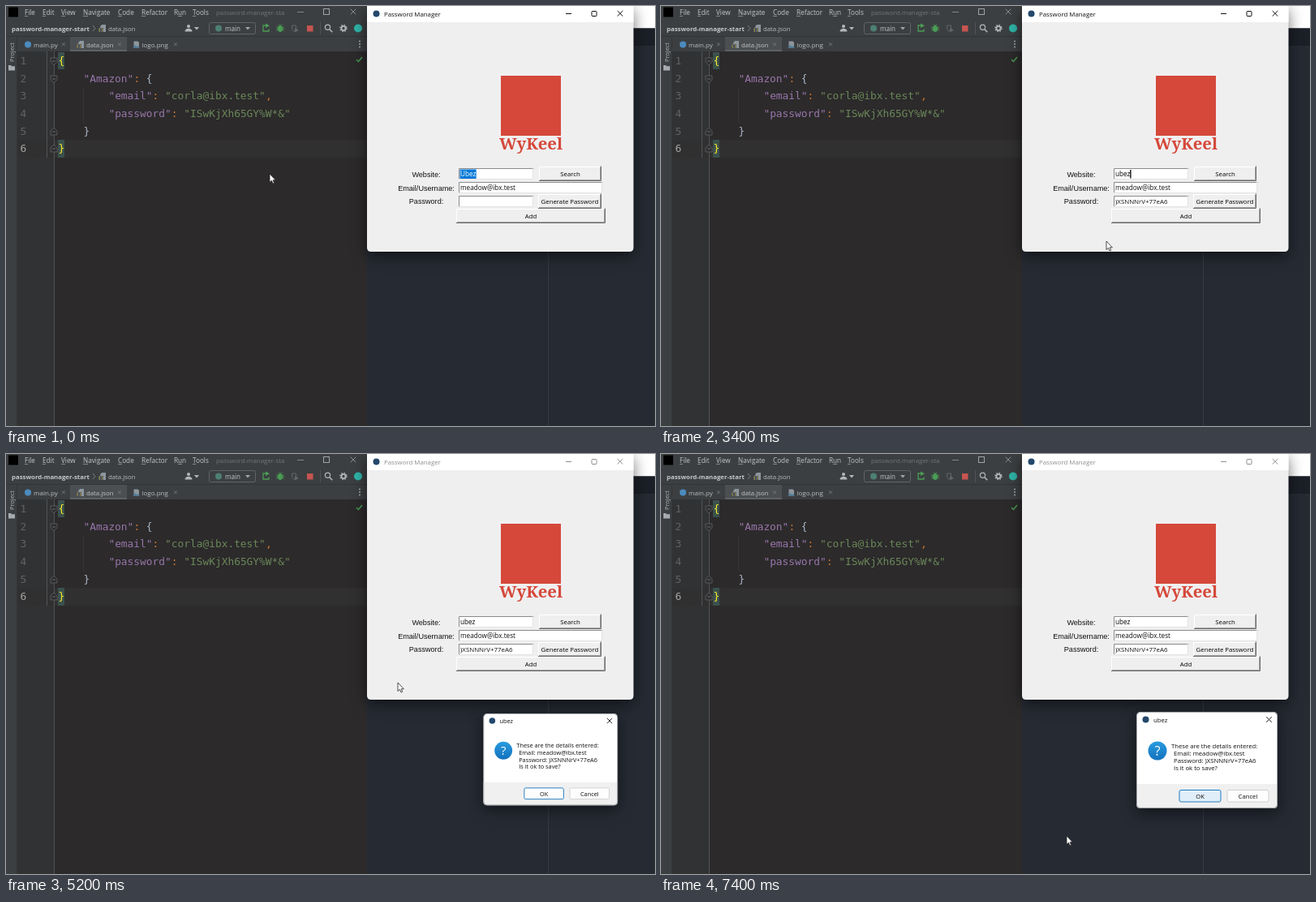
Recreate the animation shown at these times as an HTML page. Size 800 by 518 pixels, loop 8 s.

```html
<!DOCTYPE html>
<html lang="en">
<head>
<meta charset="utf-8">
<title>Password Manager</title>
<style>
  html, body { margin: 0; width: 100%; height: 100%; overflow: hidden; background: #23282f; }
  svg { display: block; width: 100%; height: 100%; }
  text { font-family: "Open Sans", "Noto Sans", sans-serif; white-space: pre; }
  .mono { font-family: "DejaVu Sans Mono", "Noto Sans Mono", monospace; }
  .label { font-family: "Liberation Sans", Arial, sans-serif; }
  .slab { font-family: "Noto Serif", serif; font-weight: 700; }
  .bold { font-weight: 700; }
  .mid { text-anchor: middle; }
  .line { fill: none; }
  .shadow { filter: drop-shadow(0 5px 9px rgba(0, 0, 0, .55)); }
</style>
</head>
<body>
<svg id="stage" viewBox="0 0 800 518"></svg>
<script>
const LOOP = 8000, STEP = 200;
const SITE = "ubez", MAIL = "meadow@ibx.test", PASS = ")XSNNNrV+77eA6";

const rect = (x, y, w, h, fill, more = "") =>
  `<rect x="${x}" y="${y}" width="${w}" height="${h}" fill="${fill}" ${more}/>`;
const dot = (x, y, r, fill, more = "") =>
  `<circle cx="${x}" cy="${y}" r="${r}" fill="${fill}" ${more}/>`;
const line = (d, color, w = 1, more = "") =>
  `<path class="line" d="${d}" stroke="${color}" stroke-width="${w}" ${more}/>`;
const fillPath = (d, fill) => `<path d="${d}" fill="${fill}"/>`;
const text = (x, y, str, size, fill, cls = "", more = "") =>
  `<text x="${x}" y="${y}" font-size="${size}" fill="${fill}" class="${cls}" ${more}>${
    str.replace(/&/g, "&amp;").replace(/</g, "&lt;")}</text>`;
const cross = (x, y, r, color, w = 1) =>
  line(`M${x - r} ${y - r}l${2 * r} ${2 * r}m0 ${-2 * r}l${-2 * r} ${2 * r}`, color, w);
const caretDown = (x, y, color) => fillPath(`M${x - 3} ${y - 1.5}h6l-3 3.4z`, color);

function menuBar() {
  // label, x, underline start, underline width
  const items = [
    ["File", 23, 0, 4], ["Edit", 45, 0, 4], ["View", 68, 0, 5], ["Navigate", 95, 0, 6],
    ["Code", 138, 0, 5], ["Refactor", 167, 0, 5], ["Run", 207, 5, 5], ["Tools", 230, 0, 4]];
  return rect(3, 1.5, 12, 12, "#000") +
    items.map(([s, x, u, w]) =>
      text(x, 10.6, s, 8.2, "#c4c5c6") + rect(x + u, 12, w, .7, "#a5a6a7")).join("") +
    text(259, 10.6, "password-manager-sta", 7.9, "#727577") +
    line("M359 7.5h8", "#85888a") +
    rect(391.5, 3.5, 7, 7, "none", 'stroke="#a2a4a6"') + cross(428, 7, 3.3, "#8b8e90");
}

function toolBar() {
  const green = "#499c54", grey = "#b4b7b9";
  return text(7, 30.6, "password-manager-start", 7.8, "#c6c8ca", "bold") +
    line("M107 24l3 3.5-3 3.5", "#85888a", .9) + fileIcon(115, 23) +
    text(126, 30.6, "data.json", 7.8, "#bbbdbf") +
    dot(225, 25, 2, grey) + fillPath("M220.5 31.5c0-5 9-5 9 0z", grey) + caretDown(235, 27.5, grey) +
    rect(250.5, 20.5, 57, 14, "none", 'rx="2" stroke="#606365"') +
    dot(262, 27.5, 4, "#4d7f73") + text(270, 30.6, "main", 8.1, "#c4c5c6") + caretDown(298, 27.5, "#a0a3a5") +
    line("M321 24h-4v7h7v-2.5", green, 1.3) + fillPath("M320 21.5l5 2.8-5 2.8z", green) +
    `<ellipse cx="338" cy="28" rx="2.9" ry="4" fill="${green}"/>` +
    line("M333.5 25.5l9 5m0-5l-9 5M333 28h10M336 22.5l2 2 2-2", green, .9) +
    line("M352.5 24h5v3q0 3-2.5 4.5q-2.5-1.5-2.5-4.5z", "#62666a", 1) + fillPath("M356 27l5 2.8-5 2.8z", "#62666a") +
    rect(371, 24, 7.5, 7.5, "#c75450") + line("M387.5 20v15", "#515456") +
    dot(396.5, 26.3, 3.1, "none", `stroke="${grey}" stroke-width="1.2"`) + line("M399 29l3.3 3.3", grey, 1.5) +
    dot(416, 27.5, 2.6, "none", `stroke="${grey}" stroke-width="1.8"`) +
    dot(416, 27.5, 4, "none", `stroke="${grey}" stroke-width="1.4" stroke-dasharray="1.57"`) +
    dot(434, 27.5, 5, "#2fb4a8");
}

function fileIcon(x, y) {
  return fillPath(`M${x + 3} ${y}h5v9h-7v-6.5z`, "#8d969d") +
    rect(x - 1, y + 4, 6, 5, "#45535a") +
    line(`M${x + 1} ${y + 4.7}q-1.6 0-1 1.8q-.6 2 1 2M${x + 3} ${y + 4.7}q1.6 0 1 1.8q.6 2-1 2`, "#d9a343", .7);
}

function tabs() {
  return rect(0, 37, 445, 1, "#323436") + rect(79, 38, 70, 18, "#4b4f51") + rect(79, 54, 70, 2, "#5d6266") +
    dot(27, 47.5, 4, "#4b8bbe") + text(34, 50.6, "main.py", 8, "#bbbdbf") +
    fileIcon(88, 43) + text(99, 50.6, "data.json", 7.8, "#c4c6c8") +
    fillPath("M157.5 43.5h5l1.5 1.500v6.500h-6.500z", "#8d969d") + fillPath("M156.5 51.500l2.500-3.500 2 2 1.500-1 2.500 2.500z", "#4d7f9b") +
    text(167.5, 50.6, "logo.png", 8, "#bbbdbf") +
    [71, 140, 209].map(x => cross(x, 47.3, 2, "#7d8183", .8)).join("") +
    [43.5, 47, 50.5].map(y => dot(436, y, .9, "#b4b7b9")).join("");
}

function code() {
  const S = 12.85, CH = 7.74, X = 64.5;
  const KEY = "#9876aa", STR = "#6a8759", SEP = "#cc7832", TXT = "#a9b7c6", HIT = "#ffef28";
  const rows = [
    [[0, "{", HIT]],
    [[4, '"Amazon"', KEY], [12, ":", SEP], [14, "{", TXT]],
    [[8, '"email"', KEY], [15, ":", SEP], [17, '"corla@ibx.test"', STR], [33, ",", SEP]],
    [[8, '"password"', KEY], [18, ":", SEP], [20, '"ISwKjXh65GY%W*&"', STR]],
    [[4, "}", TXT]],
    [[0, "}", HIT]]];
  const fold = (y, d) => `<path d="M55 ${y - 4 * d}h8v${5 * d}l-4 ${4 * d}l-4 ${-4 * d}z" fill="#2e2e30" stroke="#606366" stroke-width=".8"/>` +
    line(`M57 ${y}h4`, "#777a7d", .8);
  let out = rect(13, 56, 46, 462, "#313234") + rect(59, 56, 386, 462, "#2c2a2b") +
    rect(13, 165, 432, 22, "#313031") + rect(64, 57, 8, 21, "#3b514d") + rect(64, 165, 8, 22, "#3b514d") +
    line("M59.5 56v462", "#55575a", .9) + line("M95.5 101v43", "#3a393a", .8) + line("M50.5 56v131", "#55575a", .9);
  rows.forEach((row, i) => {
    const y = 72.2 + 21.6 * i;
    out += text(17.5, y, String(i + 1), S, i == 5 ? "#a4a3a3" : "#606366", "mono");
    row.forEach(([col, s, fill]) => out += text(X + col * CH, y, s, S, fill, "mono"));
  });
  return out + fold(68, 1) + fold(90, 1) + fold(155, -1) + fold(176, -1) +
    line("M432 66l2.5 2.5 4.5-5.5", "#499c54", 1.5);
}

function ide() {
  return rect(0, 0, 445, 518, "#3c3f41") + menuBar() + toolBar() + tabs() + code() +
    line("M13.5 38v480", "#323436") +
    text(0, 0, "Project", 7.4, "#b0b2b4", "", 'transform="translate(9.6 69) rotate(-90)"') +
    fillPath("M3 73h3l1 1.3h4v5.2h-8z", "#a6abaf");
}

function entry(x, y, w, h) {
  return rect(x, y, w, h, "#fff") + line(`M${x + .5} ${y + h}v${-h + .5}h${w}`, "#8b8b8d", 1) +
    line(`M${x} ${y + h - .5}h${w - .5}v${-h}`, "#e3e3e3", 1);
}

function button(x, y, w, h, label) {
  return rect(x, y, w, h, "#f0eff0") + line(`M${x + .5} ${y + h}v${-h + .5}h${w}`, "#fff") +
    line(`M${x + 1} ${y + h - 1.5}h${w - 2.5}v${-h + 2}`, "#a5a5a7") +
    line(`M${x} ${y + h - .5}h${w - .5}v${-h}`, "#68686a") +
    text(x + w / 2, y + h / 2 + 2.9, label, 7.8, "#000", "mid");
}

function app() {
  const label = (y, s) => text(518, y, s, 9.1, "#111", "label mid");
  return `<g class="shadow"><path d="M445 0h328.500v298q0 5-5 5h-318.500q-5 0-5-5z" fill="#f0eff0"/></g>` +
    rect(445, 0, 328.5, 20, "#fff") + dot(456.5, 9.5, 4, "#24486c") +
    `<g id="chrome">` + text(466, 12.6, "Password Manager", 7.85, "currentColor") +
    line("M690 9.5h7", "currentColor") +
    rect(722, 6.5, 6, 6, "none", 'rx="1" stroke="currentColor"') + cross(757, 9.3, 3.3, "currentColor") + `</g>` +
    rect(610, 86, 74, 74, "#d5483a") + text(647, 177, "WyKeel", 20.3, "#d5483a", "slab mid") +
    label(211, "Website:") + label(227.6, "Email/Username:") + label(244.2, "Password:") +
    entry(558, 200, 92, 14) + entry(558, 217, 177, 14) + entry(558, 234, 92, 14) +
    button(657, 198, 77, 18, "Search") + button(656, 232, 78, 18, "Generate Password") +
    button(555, 250, 184, 18, "Add") +
    rect(559.5, 201.5, 18.5, 11.5, "#0078d7", 'id="mark"') +
    text(560, 210.3, "", 8.2, "#000", "", 'id="site"') +
    rect(0, 202, 1.3, 10.5, "#000", 'id="caret"') +
    text(560, 227.2, MAIL, 8.2, "#111") + text(560, 243.8, PASS, 7.9, "#111", "", 'id="pass"');
}

function dialog() {
  const btn = (x, id, s) => rect(x, 414.5, 51, 14.5, "#fdfdfd", `id="${id}" rx="2"`) +
    text(x + 25.5, 424.7, s, 7.7, "#111", "mid");
  const lines = ["These are the details entered:", "Email: " + MAIL, "Password: " + PASS, "Is it ok to save?"];
  return `<g id="dialog"><g class="shadow">` + rect(586, 318, 174, 119, "#fff", 'rx="5"') + `</g>` +
    `<path d="M586 407h174v25q0 5-5 5h-164q-5 0-5-5z" fill="#f0f0f0"/>` +
    rect(586.4, 318.4, 173.2, 118.2, "none", 'rx="5" stroke="#777b82" stroke-width=".7"') +
    dot(597.5, 327.5, 4, "#24486c") + text(607, 331, SITE, 7.8, "#111") + cross(749.5, 327.5, 3.3, "#222") +
    dot(612, 366, 11.5, "url(#blue)") + text(612, 371.5, "?", 15.5, "#fff", "mid") +
    lines.map((s, i) => text(i ? 632 : 629, 362.6 + 9.1 * i, s, 7.7, "#111")).join("") +
    btn(639, "ok", "OK") + btn(698, "cancel", "Cancel") + `</g>`;
}

const backdrop = rect(445, 0, 355, 518, "#252a33") + rect(773, 0, 27, 27.5, "#fff") +
  rect(445, 27.5, 355, 21.5, "#1b1f27") + line("M668.5 300v218", "#3a3f48", .8);

const pointer = `<g id="pointer"><path id="arrow" d="M0 0V10.5L2.4 8.3 4 12 5.7 11.2 4.1 7.8H7.3Z" fill="#fff" stroke="#222" stroke-width=".8"/>` +
  `<g id="beam">` + line("M-2.5 -5.5h2l.5.5.5-.5h2M0-5v10M-2.5 5.5h2l.5-.5.5.5h2", "#c4c4c4", 1) + `</g></g>`;

const stage = document.getElementById("stage");
stage.innerHTML = `<defs><linearGradient id="blue" x2="0" y2="1"><stop stop-color="#2a9be0"/>` +
  `<stop offset="1" stop-color="#1272bd"/></linearGradient></defs>` +
  backdrop + ide() + app() + dialog() + pointer;

const el = {};
stage.querySelectorAll("[id]").forEach(e => el[e.id] = e);

// time, x, y
const PATH = [
  [0, 325, 207], [2200, 325, 207], [2400, 400, 234], [2600, 478, 262], [2800, 532, 284],
  [3000, 548, 291], [3400, 549, 290], [3600, 546, 278], [3800, 545, 274], [5000, 545, 274],
  [5200, 483, 282], [5600, 502, 330], [6000, 555, 425], [6200, 562, 443], [6400, 562, 433],
  [6600, 552, 464], [6800, 524, 486], [7000, 494, 481], [7200, 497, 474], [7400, 500, 471], [8000, 500, 471]];

function pointAt(t) {
  const i = Math.max(1, PATH.findIndex(p => p[0] >= t));
  const [a, b] = [PATH[i - 1], PATH[i]], k = (t - a[0]) / (b[0] - a[0]);
  return [a[1] + (b[1] - a[1]) * k, a[2] + (b[2] - a[2]) * k];
}

const show = (e, on) => e.setAttribute("visibility", on ? "visible" : "hidden");

function paintButton(e, hover, main) {
  e.setAttribute("fill", hover ? "#e0eef9" : "#fdfdfd");
  e.setAttribute("stroke", hover || main ? "#1f7cc0" : "#d0d0d0");
}

function draw(now) {
  const t = Math.floor(now % LOOP / STEP) * STEP;
  const selected = t < 800, asking = t >= 5200;

  el.site.textContent = selected ? SITE[0].toUpperCase() + SITE.slice(1)
    : SITE.slice(0, Math.floor((t - 800) / STEP));
  el.site.setAttribute("fill", selected ? "#fff" : "#000");
  const w = el.site.getComputedTextLength();
  el.mark.setAttribute("width", w + .8);
  show(el.mark, selected);
  el.caret.setAttribute("x", 560 + w - .2);
  const blinkOn = t < 1700 || (t - 2000 + 900) % 900 < 600;
  show(el.caret, !selected && !asking && blinkOn);
  show(el.pass, t >= 3000);

  el.chrome.setAttribute("color", asking ? "#8e8e8e" : "#111");
  el.dialog.style.display = asking ? "" : "none";
  el.dialog.setAttribute("transform", t === 5200 ? "translate(588.4 320) scale(.952) translate(-586 -318)" : "");
  paintButton(el.ok, t >= 7000, true);
  paintButton(el.cancel, t === 6600 || t === 6800, false);

  const [x, y] = pointAt(t);
  el.pointer.setAttribute("transform", `translate(${x} ${y})`);
  show(el.beam, t === 2400);
  show(el.arrow, t !== 2400);
}

const start = performance.now();
function tick() {
  draw(performance.now() - start);
  requestAnimationFrame(tick);
}
tick();
</script>
</body>
</html>
```
